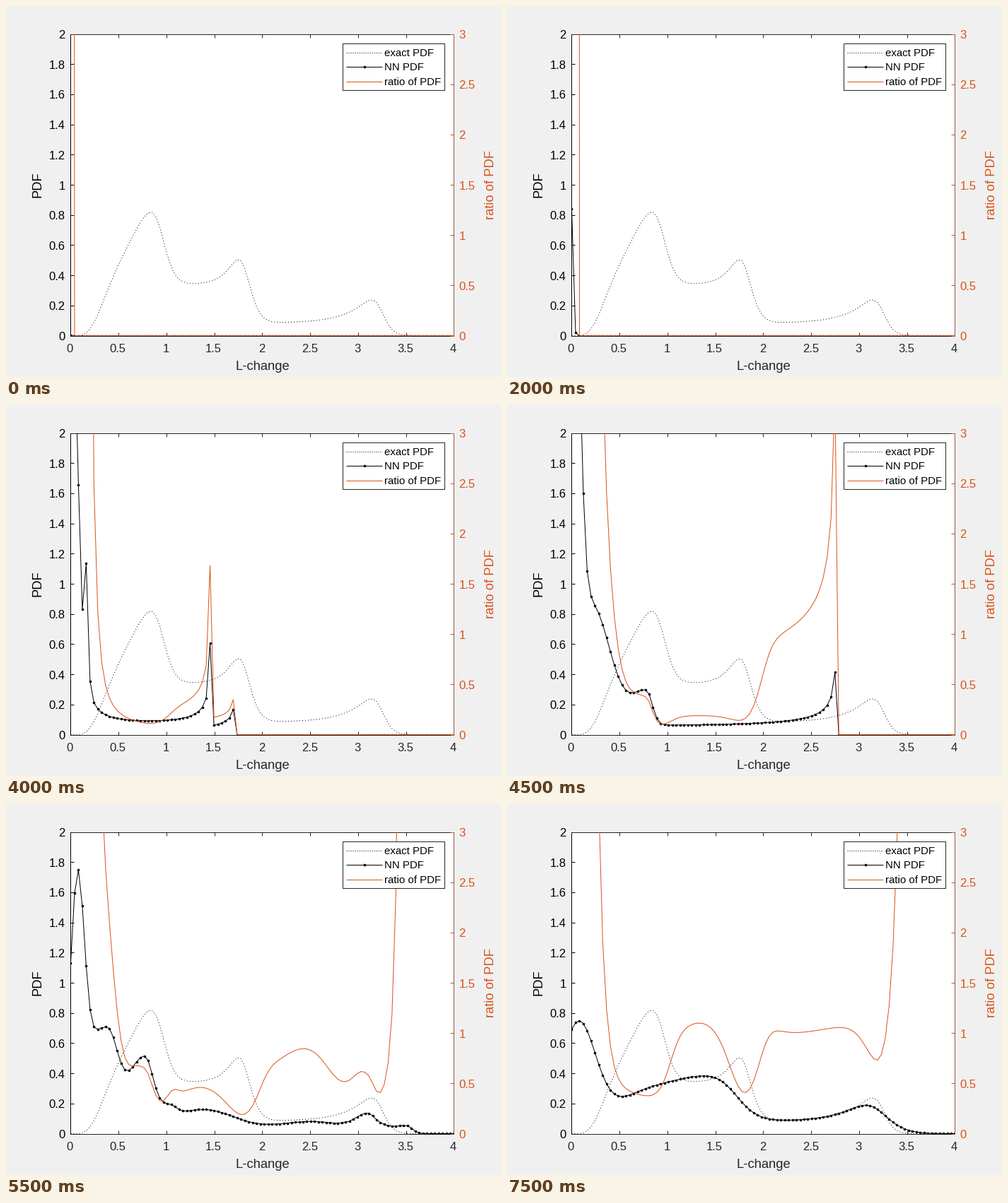
Recreate the animation shown at these times as a matplotlib script. Size 700 px wide and 525 px high, loop 8 s.

```python
import numpy as np
import matplotlib.pyplot as plt
from matplotlib.animation import FuncAnimation
from matplotlib.patches import Rectangle

W, H, DPI = 700, 525, 100
LEFT, RIGHT, TOP, BOTTOM = 91.49, 633.49, 39.51, 466.51
PX = 72 / DPI
DARK, ORANGE = "#262626", "#D95319"
N = 100
x = np.linspace(0, 4, N)
plt.rcParams["font.family"] = "Liberation Sans"


def edge(c, w):
    """Smooth step from 1 down to 0 at c; a negative w makes it rise."""
    u = (x - c) / w
    return 1 / (1 + np.exp(np.clip(u + .004 * u ** 3, -300, 300)))


def blend(a, b, c, w):
    return b + (a - b) * edge(c, w)


def mix(a, b, t):
    return a + (b - a) * t


def bump(c, h, left, right=None):
    """Gaussian with separate widths on each side."""
    s = np.where(x < c, left, right or left)
    return h * np.exp(-.5 * ((x - c) / s) ** 2)


def sheet(l, r, a, start):
    """Density of a folded sheet, singular at its ends l and r."""
    inside = (x > start) & (x < r)
    return np.where(inside, a / np.sqrt(np.where(inside, (x - l) * (r - x), 1)), 0)


def head(*vals):
    """Given first samples, zero afterwards."""
    return np.pad(np.array(vals, float), (0, N - len(vals)))


# three rising slopes, each ended by a soft edge
slope = 1.2 * np.maximum(x - .096, .002) * edge(.245, -.075)
middle = .34 + .03 * np.exp(9 * (x - 1.5))
tail = (.084 + .046 * np.exp(4.2 * (x - 2.8))) * edge(3.23, .05)
exact = blend(slope, blend(middle, tail, 1.81, .048), .947, .058) + 5e-8

growing = head(6, 4.5, 3.2, 1.3, 1.5, .9) + sheet(.18, .82, .08, .22)
folded = (head(4, 2.65, 1.655, .83, 1.135) + sheet(.18, 1.462, .059, .19)
          + sheet(-1, 1.728, .0484, 1.475))
spreading = (bump(.03, 3, .1, .06) + bump(.2, .8, .1, .2) + bump(.78, .22, .15, .06)
             + sheet(-1, 2.77, .12, -1)) * (x < 2.77)
bumpy = (.046 * edge(3.57, .02) + bump(.07, 2.2, .07) + bump(.39, .78, .18, .1)
         + bump(.775, .53, .16, .08) + bump(1.045, .075, .09, .06)
         + bump(3.11, .07, .1, .055) + bump(3.5, .04, .08, .07))
HAZE = 3e-4
relaxed = (HAZE + bump(.12, .77, .2) + bump(.72, .4, .25, .235) + bump(1.4, .325, .28, .31)
           + bump(2.52, .132, .34, .28) + bump(3.08, .15, .145, .168))
ramp = (.209 + .136 * x) * edge(.35, -.15)
last = (.081 + .058 * np.exp(4 * (x - 2.8))) * edge(3.172, .094)
settled = HAZE + bump(.068, .72, .183) + blend(ramp, last, 1.705, .11)

steps = [
    head(.004), head(1.73), head(.45), head(3), head(.84, .02),
    head(8, 12, 9), head(8, 9, 5, 1.74, 1.62, 2.83, .006),
    growing, folded, spreading, bumpy,
    mix(bumpy, relaxed, .4), mix(bumpy, relaxed, .75), relaxed,
    mix(relaxed, settled, .5), settled,
]

fig = plt.figure(figsize=(W / DPI, H / DPI), dpi=DPI, facecolor="#F0F0F0")
box = [LEFT / W, 1 - BOTTOM / H, (RIGHT - LEFT) / W, (BOTTOM - TOP) / H]
ax = fig.add_axes(box, xlim=(0, 4), ylim=(0, 2))
ax2 = fig.add_axes(box, xlim=(0, 4), ylim=(0, 3))
ax2.patch.set_visible(False)
top = fig.add_axes([0, 0, 1, 1], xlim=(0, W), ylim=(H, 0))
top.axis("off")

ax.set_xticks(np.arange(0, 4.1, .5))
ax.set_yticks(np.arange(0, 2.1, .2))
ax2.set_yticks(np.arange(0, 3.1, .5))
tick = dict(direction="in", length=5 * PX, width=PX)
ax.tick_params(axis="x", top=True, color=DARK, labelbottom=False, **tick)
ax.tick_params(axis="y", color="k", labelleft=False, **tick)
ax2.tick_params(axis="x", bottom=False, labelbottom=False)
ax2.tick_params(axis="y", left=False, right=True, color=ORANGE, labelleft=False, **tick)
for side in ("left", "right", "top", "bottom"):
    ax.spines[side].set(linewidth=PX, color="k" if side == "left" else DARK,
                        visible=side != "right")
    ax2.spines[side].set(linewidth=PX, color="#8C5A46", visible=side == "right")


def label(px, py, s, size, color, ha="center", rot=0):
    top.text(px, py, s, fontsize=size * PX, color=color, ha=ha, va="baseline",
             rotation=rot, rotation_mode="anchor")


TICK, NAME, KEY = 16.67, 18.33, 15
for v in ax.get_xticks():
    label(mix(LEFT, RIGHT, v / 4) - 1, 490.5, f"{v:g}", TICK, DARK)
for v in ax.get_yticks():
    label(83.5, mix(BOTTOM, TOP, v / 2) + 6.5, f"{v:g}", TICK, "k", "right")
for v in ax2.get_yticks():
    label(640.5, mix(BOTTOM, TOP, v / 3) + 6.5, f"{v:g}", TICK, ORANGE, "left")
label(362.5, 515, "L-change", NAME, DARK)
label(49.5, 252.5, "PDF", NAME, "k", rot=90)
label(689.5, 252.5, "ratio of PDF", NAME, ORANGE, rot=90)

dot = dict(marker="o", markersize=3.6 * PX, markeredgewidth=0)
ax.plot(x, exact, color="k", lw=PX, ls=(0, (1, 3)), dash_capstyle="butt")
nn, = ax.plot([], [], color="k", lw=PX, **dot)
ratio, = ax2.plot([], [], color=ORANGE, lw=PX)

top.add_patch(Rectangle((476.49, 52.51), 144, 66, fc="w", ec=DARK, lw=PX))
for y, name, style in ((65.51, "exact PDF", dict(color="k", ls=(0, (1, 2)))),
                       (85.51, "NN PDF", dict(color="k")),
                       (106.51, "ratio of PDF", dict(color=ORANGE))):
    top.plot([481, 532], [y, y], lw=PX, solid_capstyle="butt", dash_capstyle="butt", **style)
    label(535, y + 5.5, name, KEY, "k", "left")
top.plot([506.5], [85.51], color="k", **dot)


def update(i):
    y = steps[i]
    nn.set_data(x, y)
    ratio.set_data(x, np.minimum(y / exact, 5000))
    return nn, ratio


anim = FuncAnimation(fig, update, frames=len(steps), interval=500,
                     repeat=True, repeat_delay=0)
plt.show()
```
